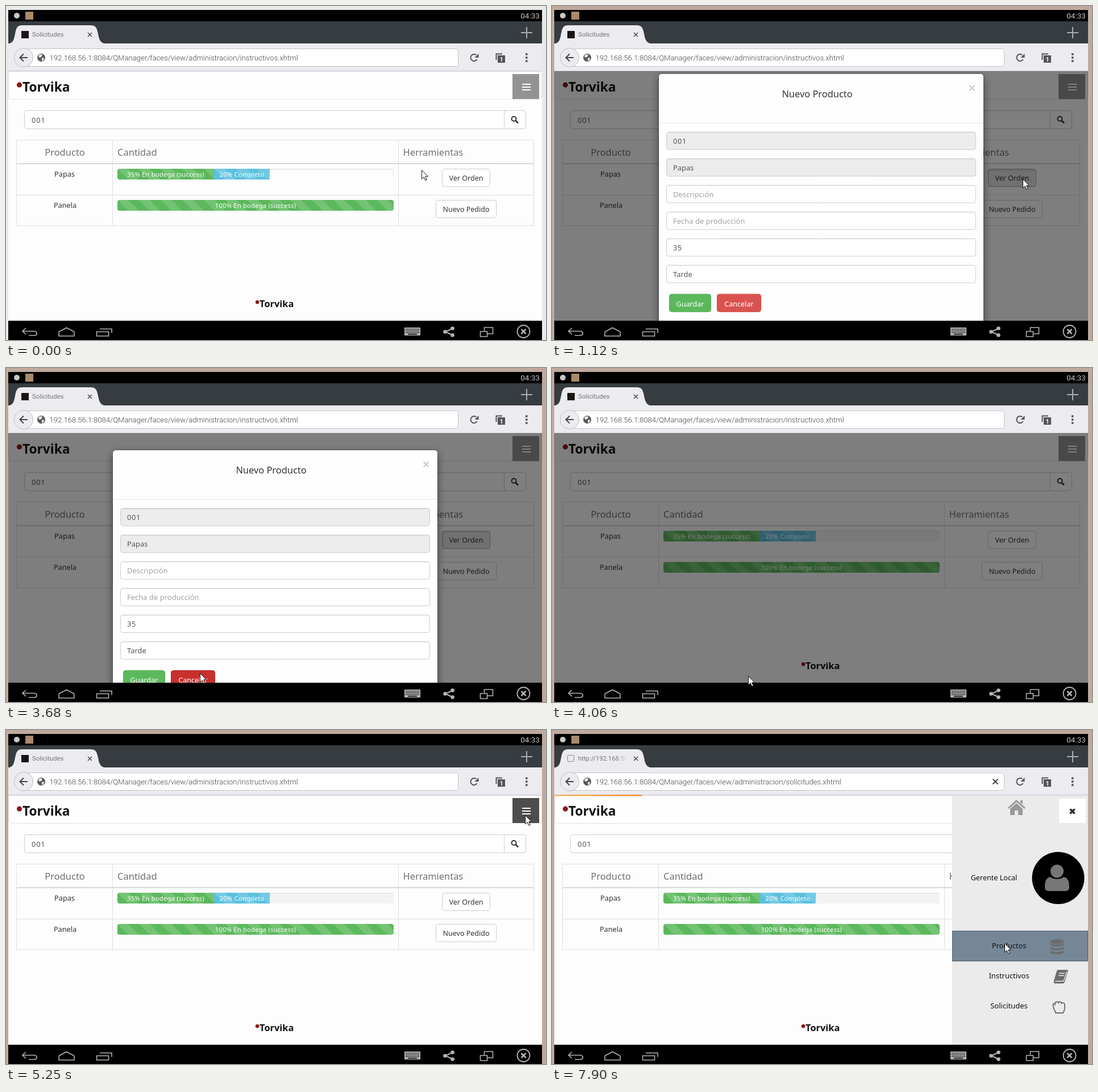
An HTML page with a canvas that plays this animation: 950x589 px, repeating every 8000 ms.

```html
<!DOCTYPE html>
<html lang="es">
<head>
<meta charset="utf-8">
<title>Solicitudes</title>
<style>
html, body { margin: 0; width: 100%; height: 100%; overflow: hidden; background: #bfaa9d; }
canvas { display: block; width: 950px; height: 589px; }
</style>
</head>
<body>
<canvas id="stage" width="950" height="589"></canvas>
<script>
const g = document.getElementById('stage').getContext('2d');
const LOOP = 8000;
const SANS = '"Noto Sans", "Open Sans", sans-serif';
const ROBOTO = 'Roboto, "Noto Sans", sans-serif';

// The screen refreshes only at these times.
const run = (start, n) => Array.from({ length: n }, (_, i) => start + 120 * i);
const ticks = [0, 150, 300, 450, 850, ...run(1000, 3), ...run(1390, 2), 1660, 2500, 2780,
  ...run(2930, 5), 3680, 3930, 4060, ...run(4200, 3), ...run(4590, 2), ...run(4860, 3),
  5250, ...run(5680, 5), ...run(6310, 2), ...run(6580, 2), 6850, ...run(7780, 2)];

// Pointer path: time, x, y
const path = [
  [0, 731, 289], [150, 817, 298], [300, 854, 306], [1000, 854, 306], [1240, 801, 304],
  [1510, 445, 406], [1660, 422, 455], [2500, 429, 390], [2780, 429, 392], [3410, 341, 538],
  [3930, 341, 538], [4060, 345, 543], [4320, 400, 463], [4440, 445, 408], [4710, 780, 226],
  [4980, 893, 164], [5100, 913, 150], [5680, 913, 150], [5920, 895, 142], [6160, 826, 222],
  [6430, 786, 337], [6700, 795, 372], [6850, 796, 376], [LOOP, 796, 376]
];

const clamp = v => Math.max(0, Math.min(1, v));
const part = (t, start, length) => clamp((t - start) / length);

function bezier(x1, y1, x2, y2) {
  const at = (a, b, s) => 3 * a * s * (1 - s) ** 2 + 3 * b * s * s * (1 - s) + s ** 3;
  return x => {
    let lo = 0, hi = 1;
    for (let i = 0; i < 24; i++) {
      const mid = (lo + hi) / 2;
      if (at(x1, x2, mid) < x) lo = mid; else hi = mid;
    }
    return at(y1, y2, hi);
  };
}
const ease = bezier(.25, .1, .25, 1);
const easeOut = bezier(0, 0, .58, 1);

function rect(x, y, w, h, fill) {
  g.fillStyle = fill;
  g.fillRect(x, y, w, h);
}

function box(x, y, w, h, r, fill, line) {
  g.beginPath();
  g.roundRect(x, y, w, h, r);
  if (fill) { g.fillStyle = fill; g.fill(); }
  if (line) { g.strokeStyle = line; g.lineWidth = 1; g.stroke(); }
}

function disc(x, y, r, fill) {
  g.beginPath();
  g.arc(x, y, r, 0, 7);
  g.fillStyle = fill;
  g.fill();
}

function ring(x, y, r, color, width) {
  g.beginPath();
  g.arc(x, y, r, 0, 7);
  g.strokeStyle = color;
  g.lineWidth = width;
  g.stroke();
}

function stroke(d, color, width) {
  g.strokeStyle = color;
  g.lineWidth = width;
  g.stroke(new Path2D(d));
}

function shape(d, fill) {
  g.fillStyle = fill;
  g.fill(new Path2D(d));
}

function text(s, x, y, size, color, o = {}) {
  g.font = `${o.weight || 400} ${size}px ${o.face || SANS}`;
  g.textAlign = o.align || 'left';
  g.letterSpacing = (o.space || 0) + 'px';
  g.fillStyle = color;
  g.fillText(s, x, y);
  g.letterSpacing = '0px';
}
const center = (s, x, y, size, color, weight) => text(s, x, y, size, color, { align: 'center', weight });

function cross(x, y, r, color, width) {
  stroke(`M${x - r} ${y - r}l${2 * r} ${2 * r}M${x - r} ${y + r}l${2 * r} ${-2 * r}`, color, width);
}

function clipped(x, y, w, h, draw, r = 0) {
  g.save();
  g.beginPath();
  g.roundRect(x, y, w, h, r);
  g.clip();
  draw();
  g.restore();
}

function brand(x, y, size) {
  disc(x + size * .22, y - size * .5, size * .2, '#8c1518');
  text('Torvika', x + size * .46, y, size, '#111', { weight: 700 });
}

function browser(t) {
  const loading = t >= 7900;
  rect(4, 7, 939, 20, '#000');
  disc(19, 17, 5, '#c8c8c8');
  rect(34, 10, 14, 14, '#a98a6c');
  text('04:33', 939, 22, 13.6, '#c4c4c4', { face: ROBOTO, align: 'right' });

  rect(4, 27, 939, 39, '#363c40');
  rect(4, 66, 939, 49, '#ebebf0');
  shape('M4 66.5C13 65 14 59 16 49C18 38 20 34 29 34H149C158 34 160 39 162 49C164 60 166 65 175 66.5Z', '#ebebf0');
  if (loading) {
    box(27.5, 44.5, 11, 11, 1, null, '#888');
    const fade = g.createLinearGradient(112, 0, 133, 0);
    fade.addColorStop(0, '#777');
    fade.addColorStop(1, '#77777700');
    clipped(46, 40, 87, 20, () => text('http://192.168.56.1', 46, 54, 11.3, fade, { face: ROBOTO }));
  } else {
    rect(27, 44, 13, 13, '#1c1516');
    text('Solicitudes', 46, 54, 11.3, '#777', { face: ROBOTO });
  }
  cross(147.5, 50.5, 3.5, '#555', 1.7);
  stroke('M906 47H926M916 37V57', '#a9adb0', 2);

  box(31.5, 75.5, 764, 31, 3, '#fff', '#c3c3c8');
  disc(31, 91, 16.5, '#ebebf0');
  ring(31, 91, 16.5, '#bcbcc4', 1);
  stroke('M38 91H25M31 84.5L24.5 91L31 97.5', '#444', 2);
  disc(62, 91, 7, '#595959');
  shape('M58 86l4-1 2 2-2 3-3 1-2-2zM63 92l3-1 1 2-2 4-2-1z', '#e8e8e8');
  const file = loading ? 'solicitudes' : 'instructivos';
  text(`192.168.56.1:8084/QManager/faces/view/administracion/${file}.xhtml`, 76.5, 95.5, 13.1, '#444',
    { face: ROBOTO, weight: 300 });
  if (loading) cross(780, 91, 4.5, '#444', 2);

  g.beginPath();
  g.arc(823.5, 91, 6, .5, 5.4);
  g.strokeStyle = '#555';
  g.lineWidth = 2;
  g.stroke();
  shape('M831.5 84V91H824.5Z', '#555');
  stroke('M862.5 95V84.5H873', '#555', 2);
  rect(865, 87, 13, 13, '#555');
  text('1', 871.5, 97.5, 10, '#fff', { align: 'center', face: ROBOTO, weight: 700 });
  for (const y of [85, 91, 97]) rect(914, y - 1.7, 3.5, 3.5, '#555');
  rect(4, 114, 939, 1.5, '#c9ccd5');
}

function systemBar() {
  const c = '#b4b4b4';
  rect(4, 555, 939, 34, '#000');
  stroke('M35 568L29 573.5L35 579M29 573.5H49C56 573.5 56 581 49 581H40', c, 1.6);
  stroke('M93 574.5L106.5 567.5L120 574.5M93 574.5V582H120V574.5', c, 1.6);
  stroke('M159.5 574.5H180.5V582H159.5ZM165 569.5H186V576.5', c, 1.6);
  rect(701, 567, 28, 14, c);
  for (let i = 0; i < 10; i++)
    for (let j = 0; j < 3; j++) rect(703 + i * 2.5, 569 + j * 3, 1.4, 1.6, '#000');
  rect(707, 578, 16, 1.5, '#000');
  stroke('M786 568.5L773 574.5L786 580.5', c, 2);
  disc(785.5, 568.5, 3.3, c);
  disc(772.5, 574.5, 3.3, c);
  disc(785.5, 580.5, 3.3, c);
  stroke('M841.5 573V567H856.5V578H847', c, 1.6);
  stroke('M834.5 574H846.5V583H834.5Z', c, 1.6);
  ring(910.5, 574, 11, c, 1.8);
  cross(910.5, 574, 4, c, 2.6);
}

function bar(x, y, w, color, label) {
  const h = 19, tile = 38;
  rect(x, y, w, h, color);
  clipped(x, y, w, h, () => {
    for (let i = -tile; i < w; i += tile)
      shape(`M${x + i} ${y}h19l19 19h-19z`, 'rgba(255,255,255,.15)');
  });
  text(label, x + w / 2, y + 14, 11.2, '#fff', { align: 'center', space: .22 });
}

function button(x, y, w, label, down) {
  box(x + .5, y + .5, w, 31, 4, down ? '#e4e4e4' : '#fff', down ? '#a6a6a6' : '#ccc');
  if (down) {
    const shade = g.createLinearGradient(0, y, 0, y + 6);
    shade.addColorStop(0, 'rgba(0,0,0,.1)');
    shade.addColorStop(1, 'rgba(0,0,0,0)');
    box(x + 1, y + 1, w - 1, 30, 4, shade);
  }
  center(label, x + w / 2 + .5, y + 21, 12.5, '#333');
}

function page(t) {
  rect(4, 115.5, 939, 440, '#fdfdfd');
  box(4.5, 115.5, 938, 49, 4, '#fefefe', '#e4e4e6');
  brand(18.5, 150.5, 22.7);
  rect(891, 120, 47, 44, t >= 5250 ? '#4d4d4d' : '#939393');
  for (const y of [137, 142, 147]) rect(908, y, 15, 2, '#fff');

  box(32.5, 184.5, 882, 32, 4, '#fff', '#ccc');
  rect(876, 185, 1, 31, '#ccc');
  text('001', 45, 206, 13, '#555', { space: .7 });
  ring(893.5, 199, 4, '#333', 2);
  stroke('M896.5 202L901 206.5', '#333', 2.6);

  const line = '#dfdfdf';
  g.strokeStyle = line;
  g.lineWidth = 1;
  g.strokeRect(18.5, 236.5, 910, 151);
  rect(187, 237, 1, 151, line);
  rect(690, 237, 1, 151, line);
  rect(19, 277, 910, 2, '#d8d8d8');
  rect(19, 333, 910, 1, line);
  center('Producto', 103.5, 264, 16.5, '#707070', 500);
  text('Cantidad', 196, 264, 16.5, '#707070', { weight: 500 });
  text('Herramientas', 698.5, 264, 16.4, '#707070', { weight: 500 });
  center('Papas', 103, 301, 12.7, '#333');
  center('Panela', 104, 356, 12.7, '#333');

  clipped(196, 287, 486, 19, () => {
    rect(196, 287, 486, 19, t < 450 ? '#fdfdfd' : '#f3f3f3');
    rect(196, 287, 486, 1.5, '#e3e3e3');
    if (t < 450) rect(681, 287, 1, 14, '#e3e3e3');
    bar(196, 287, 170, '#5cb85c', '35% En bodega (success)');
    bar(366, 287, 98, '#5bc0de', '20% Completo');
  }, 4);
  clipped(196, 342, 486, 19, () => bar(196, 342, 486, '#5cb85c', '100% En bodega (success)'), 4);

  button(767, 287, 84, 'Ver Orden', t >= 450 && t < 3930);
  button(756, 342, 106, 'Nuevo Pedido');
  brand(438.5, 530.5, 16.4);
}

function action(x, w, label, fill, line) {
  box(x + .5, 533.5, w - 1, 31, 4, fill, line);
  center(label, x + w / 2, 555, 12.6, '#fff');
}

function modal(t) {
  const leaving = t >= 3930;
  const alpha = leaving ? 1 - part(t, 3850, 150) : part(t, 940, 150);
  if (!alpha) return;
  const away = leaving ? part(t, 3850, 400) : 1 - easeOut(part(t, 940, 300));
  g.save();
  g.globalAlpha = alpha;
  g.translate(0, -118 * away);
  g.shadowColor = 'rgba(0,0,0,.5)';
  g.shadowBlur = 15;
  g.shadowOffsetY = 5;
  box(188, 145, 571, 450, 5, '#fefefe');
  g.shadowColor = 'transparent';
  box(187.5, 144.5, 572, 451, 6, null, 'rgba(0,0,0,.2)');
  center('Nuevo Producto', 466.5, 186, 16.4, '#333', 500);
  cross(739, 170, 4.5, '#c4c4c4', 2);
  rect(188, 231, 571, 1, '#e5e5e5');
  ['001', 'Papas', 'Descripción', 'Fecha de producción', '35', 'Tarde'].forEach((label, i) => {
    const y = 247 + 47 * i, hint = i === 2 || i === 3;
    box(201.5, y + .5, 544, 31, 4, i < 2 ? '#ececec' : '#fff', '#ccc');
    rect(204, y + 1, 539, 1, 'rgba(0,0,0,.06)');
    text(label, 213, y + 21, 12.8, hint ? '#a0a0a0' : '#555', { space: /\d/.test(label) ? .7 : .1 });
  });
  action(206, 74, 'Guardar', '#5cb85c', '#4cae4c');
  if (t >= 3680) action(290, 78, 'Cancelar', '#c9302c', '#ac2925');
  else action(290, 78, 'Cancelar', '#d9534f', '#d43f3a');
  g.restore();
}

function backdrop(t) {
  const a = t < 4000 ? part(t, 772, 150) : 1 - part(t, 4090, 150);
  if (a) rect(4, 115, 939, 440, `rgba(0,0,0,${a / 2})`);
}

function menu(t) {
  const p = part(t, 5550, 400);
  if (!p) return;
  g.save();
  g.translate(Math.round(239 * (1 - ease(p))), 0);
  rect(704, 116, 239, 439, '#ebebeb');
  const ink = '#777';
  shape('M817 123L833 137L831 139L817 127L804 139L802 137ZM824 124H828V131L824 128Z', '#999');
  shape('M817 129L828 139V150H820V142H814V150H806V139Z', '#999');
  rect(892, 121, 47, 43, '#fff');
  cross(915.5, 143.5, 4, '#2a2a2a', 3.2);

  center('Gerente Local', 777.5, 264.5, 12.6, '#111');
  disc(890.5, 261, 46, '#000');
  disc(888.5, 249, 11.5, ink);
  shape('M877 259C881 264 896 264 900 259C908 260 910 268 910 277C910 282 907 284 903 284H874C870 284 867 282 867 277C867 268 869 260 877 259Z', ink);

  if (t >= 7780) {
    rect(704, 354, 239, 54, '#758797');
    g.setLineDash([1, 1]);
    g.strokeStyle = '#26323c';
    g.lineWidth = 1;
    g.strokeRect(704.5, 354.5, 238, 53);
    g.setLineDash([]);
  }
  center('Productos', 804, 384.5, 12.7, '#111');
  center('Instructivos', 804, 438, 12.9, '#111');
  center('Solicitudes', 804, 491, 13, '#111');

  const dark = '#6d6d6d';
  g.fillStyle = dark;
  g.beginPath();
  g.ellipse(888.5, 373, 12, 4.2, 0, 0, 7);
  g.fill();
  for (const y of [375, 382, 388.5])
    shape(`M876.5 ${y}C879 ${y + 4} 898 ${y + 4} 900.5 ${y}V${y + 3.5}C899 ${y + 8} 878 ${y + 8} 876.5 ${y + 3.5}Z`, dark);

  shape('M890 423H906Q908.5 423 907.5 426L902 444Q901 447 898 447H884Q882 445 883 442L888 425Q889 423 890 423Z', dark);
  stroke('M892 429H902M891 433H901M885.5 443H900L906 426', '#ebebeb', 1.4);
  stroke('M882 487C880 483 884 481 885 483C885 479 890 478 891 481C892 478 896 479 896.5 482C899 480 902 481 902 485V491C902 495 900 496 899 499H886C886 496 882 493 882 487Z', dark, 1.9);
  g.restore();
}

function pointer(t) {
  const i = Math.max(1, path.findIndex(k => k[0] > t));
  const [t0, x0, y0] = path[i - 1], [t1, x1, y1] = path[i];
  const p = part(t, t0, t1 - t0);
  g.save();
  g.translate(Math.round(x0 + (x1 - x0) * p), Math.round(y0 + (y1 - y0) * p));
  const arrow = 'M.5 .5V16L4.2 12.6L6.8 18.4L9.2 17.3L6.7 11.7H11.5Z';
  shape(arrow, '#fff');
  stroke(arrow, '#111', 1);
  g.restore();
}

function draw(now) {
  const time = now % LOOP;
  const t = ticks.filter(k => k <= time).pop();
  rect(0, 0, 950, 589, t < 450 ? '#e9e9e9' : '#bfaa9d');
  browser(t);
  clipped(4, 115, 939, 440, () => {
    page(t);
    backdrop(t);
    modal(t);
    menu(t);
  });
  if (t >= 7900) {
    const glow = g.createLinearGradient(4, 0, 158, 0);
    glow.addColorStop(0, '#f6b26b');
    glow.addColorStop(1, '#f08a24');
    rect(4, 114, 154, 2.5, glow);
  }
  systemBar();
  pointer(t);
}

const began = performance.now();
function tick() {
  draw(performance.now() - began);
  requestAnimationFrame(tick);
}
tick();
</script>
</body>
</html>
```
